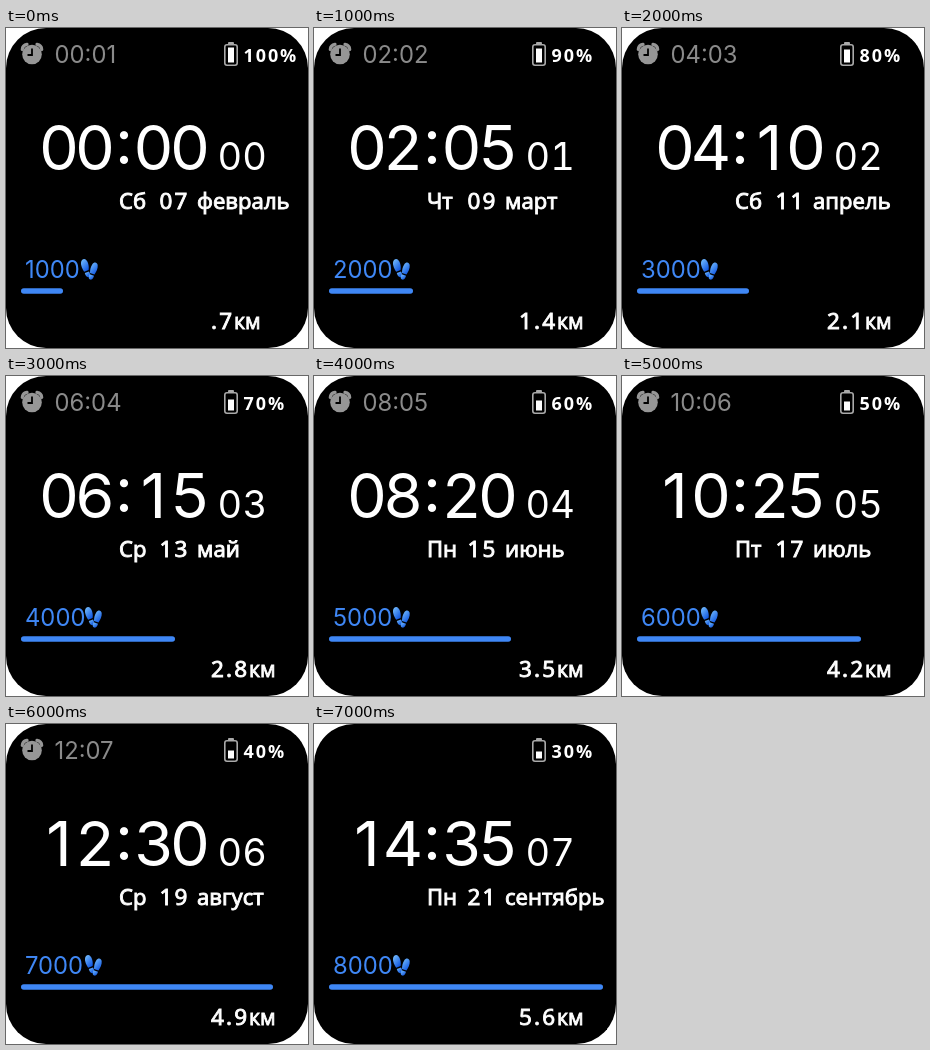
An HTML page that plays this animation: 302x320 px, repeating every 8 s.

```html
<!DOCTYPE html>
<html lang="ru">
<head>
<meta charset="utf-8">
<title>Watch face</title>
<style>
html, body { margin: 0; width: 100%; height: 100%; overflow: hidden; background: #fff; }
svg { display: block; width: 302px; height: 320px; }
.ui { font-family: Inter, sans-serif; }
.sans { font-family: "Noto Sans", "Open Sans", sans-serif; fill: #fff; }
.main { font-size: 62.5px; font-weight: 400; fill: #fff; text-anchor: middle; }
.alarm { font-size: 23.8px; font-weight: 400; fill: #8a8a8a; }
.steps { font-size: 23.8px; font-weight: 400; fill: #3f87f5; }
.sec { font-size: 38px; font-weight: 400; fill: #fff; font-variant-numeric: tabular-nums; }
.pct { font-size: 18px; font-weight: 700; letter-spacing: 1.9px; }
.date { font-size: 22px; stroke: #fff; stroke-width: 0.9px; }
.num { font-size: 22.5px; letter-spacing: 2.2px; }
.km { font-size: 21px; stroke: #fff; stroke-width: 0.8px; }
</style>
</head>
<body>
<svg viewBox="0 0 302 320">
  <defs>
    <linearGradient id="blue" x1="0" y1="0" x2="0.7" y2="1">
      <stop offset="0" stop-color="#7cc4ff"/>
      <stop offset="1" stop-color="#0f55e0"/>
    </linearGradient>
  </defs>
  <rect width="302" height="320" rx="40"/>

  <g id="alarm">
    <path d="M16.3 21.5Q16.5 17 21 16.3M35.7 21.5Q35.5 17 31 16.3" fill="none" stroke="#969696" stroke-width="3.2" stroke-linecap="round"/>
    <circle cx="26" cy="26.5" r="9.8" fill="#969696"/>
    <path d="M26 20.5V27H21.5" fill="none" stroke="#000" stroke-width="1.8"/>
    <text id="alarmTime" class="ui alarm" x="48.5" y="35"></text>
  </g>

  <rect x="222" y="14" width="6" height="2.5" rx="1" fill="#aaa"/>
  <rect x="218.8" y="16.8" width="12.4" height="20.4" rx="2.2" fill="none" stroke="#aaa" stroke-width="1.6"/>
  <rect id="charge" x="222" width="6" fill="#fff"/>
  <text id="pct" class="sans pct" x="237.5" y="34"></text>

  <g id="clock" class="ui main"></g>
  <text id="sec" class="ui sec" x="211.5" y="141.5"></text>

  <text id="wday" class="sans date" x="113" y="180.5"></text>
  <text id="day" class="sans date num" x="153.5" y="180.5"></text>
  <text id="month" class="sans date" x="191" y="180.5"></text>

  <text id="steps" class="ui steps" x="19" y="250"></text>
  <g id="feet" fill="url(#blue)">
    <path d="M2 232C4.5 229.5 7 232 8 235C9 238.5 8.8 240.5 8.6 242L4.2 243.8C2 240.5-.5 235 2 232Z"/>
    <path d="M4.8 245L9 243.4C10.6 246 10.6 248.2 9 249C7 249.7 5.5 248 4.8 245Z"/>
    <path d="M12.2 236.5C14 233.5 17.2 234 17.7 237C18.2 240.5 16 244 14.5 246.5L10 245C10 242 10.6 239 12.2 236.5Z"/>
    <path d="M9.7 246.3L14 247.8C13.4 250.5 12 252.2 10 251.5C8.2 250.8 8.4 248.6 9.7 246.3Z"/>
  </g>
  <rect id="bar" x="15" y="260.2" height="5.6" rx="2.8" fill="#3f87f5"/>

  <text id="dist" class="sans date num" x="205" y="300.5"></text>
  <text id="km" class="sans km" y="300.5">км</text>
</svg>
<script>
const $ = id => document.getElementById(id);
const put = (id, text) => { $(id).textContent = text; };
const two = n => String(n).padStart(2, "0");
const weekdays = "Сб Чт Сб Ср Пн Пт Ср Пн".split(" ");
const months = "февраль март апрель май июнь июль август сентябрь".split(" ");

const cells = [53, 89, 118, 147.5, 184].map((x, i) => {
  const cell = document.createElementNS("http://www.w3.org/2000/svg", "text");
  cell.setAttribute("x", x);
  cell.setAttribute("y", i === 2 ? 136 : 142);
  $("clock").append(cell);
  return cell;
});

function show(n) {
  const hours = two(2 * n), charge = 100 - 10 * n, fill = Math.round(3 + charge * 0.12);
  $("alarm").style.display = n < 7 ? "" : "none";
  put("alarmTime", hours + ":" + two(n + 1));
  [...(hours + ":" + two(5 * n))].forEach((c, i) => { cells[i].textContent = c; });
  put("sec", two(n));
  put("pct", charge + "%");
  $("charge").setAttribute("y", 34.5 - fill);
  $("charge").setAttribute("height", fill);
  put("wday", weekdays[n]);
  put("day", two(7 + 2 * n));
  put("month", months[n]);
  put("steps", 1000 * (n + 1));
  $("feet").setAttribute("transform", `translate(${n ? 78 : 74} 0)`);
  // The bar grows in 14 px segments
  const segments = Math.floor(2.5 * (n + 1)) + 1;
  $("bar").setAttribute("width", Math.min(274, 14 * segments));
  put("dist", (0.7 * (n + 1)).toFixed(1).replace(/^0/, ""));
  $("km").setAttribute("x", n ? 243 : 228);
}

let shown = -1;
function tick() {
  const n = Math.floor(performance.now() / 1000) % 8;
  if (n !== shown) show(shown = n);
  requestAnimationFrame(tick);
}
tick();
</script>
</body>
</html>
```
